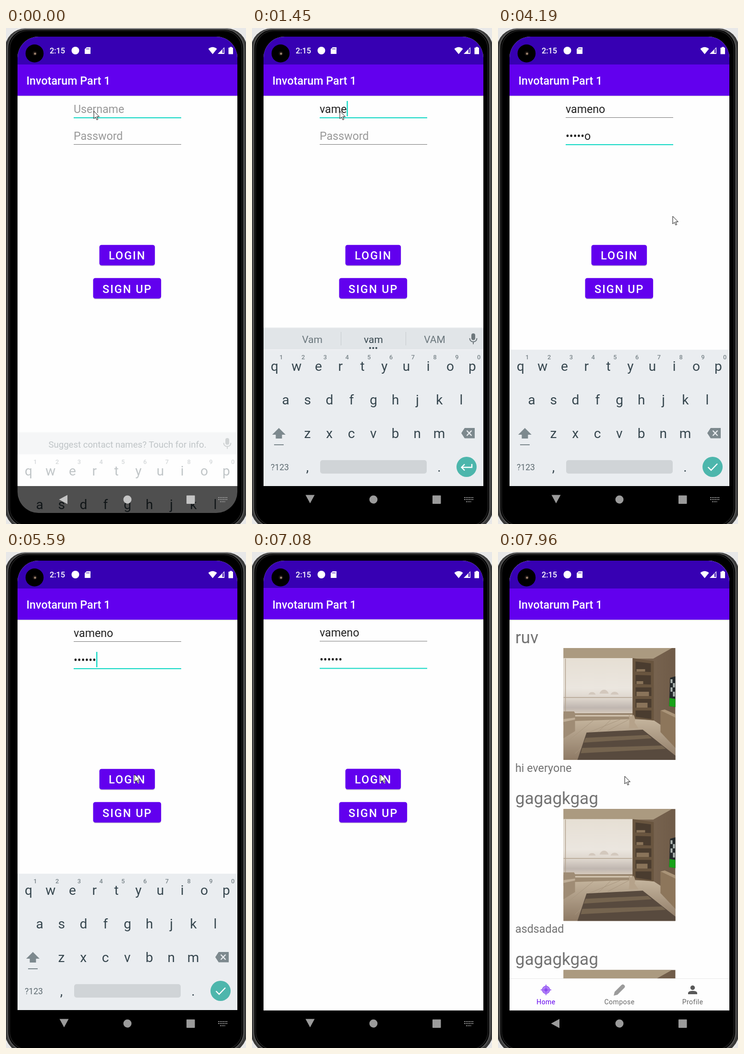
Write an HTML page that moves like this. It is 500x1033 px and loops after 8000 ms.

```html
<!DOCTYPE html>
<html lang="en">
<head>
<meta charset="utf-8">
<title>Login demo</title>
<style>
html, body { margin: 0; width: 100%; height: 100%; overflow: hidden; background: #e8e8e8; }
svg { display: block; width: 100%; height: 100%; font-family: Roboto, sans-serif; }
text { white-space: pre; }
.mid { text-anchor: middle; }
.med { font-weight: 500; }
.field { font-size: 23.2px; }
.btn { font-size: 23.3px; font-weight: 500; letter-spacing: 2.08px; fill: #fff; }
.key { font-size: 28px; fill: #37474f; text-anchor: middle; }
.num { font-size: 12.8px; font-weight: 500; fill: #7a858a; text-anchor: middle; }
.sug { font-size: 21px; fill: #6b777d; text-anchor: middle; }
.name { font-size: 35px; fill: #737373; }
.note { font-size: 23.3px; fill: #737373; }
.tab { font-size: 14px; letter-spacing: .45px; text-anchor: middle; fill: #666; }
</style>
</head>
<body>
<svg viewBox="0 0 500 1033" preserveAspectRatio="none">
  <defs>
    <clipPath id="screen"><rect x="24" y="18" width="458" height="992" rx="44"/></clipPath>
    <clipPath id="list"><rect x="24" y="141" width="458" height="747"/></clipPath>
    <linearGradient id="sky" x2="0" y2="1">
      <stop offset="0" stop-color="#e6dfd4"/><stop offset=".55" stop-color="#ebe6df"/>
      <stop offset=".74" stop-color="#dcd4cb"/><stop offset=".9" stop-color="#bfb6b0"/>
      <stop offset="1" stop-color="#d6cabc"/>
    </linearGradient>
    <linearGradient id="wall"><stop offset="0" stop-color="#96826a"/><stop offset="1" stop-color="#6f5b48"/></linearGradient>
    <linearGradient id="floor" x2="0" y2="1"><stop offset="0" stop-color="#c4b49d"/><stop offset="1" stop-color="#8e7a65"/></linearGradient>
    <g id="bars">
      <rect x="24" y="10" width="458" height="66" fill="#3700b3"/>
      <rect x="24" y="76" width="458" height="65" fill="#6200ee"/>
      <rect x="24" y="141" width="458" height="1.5" opacity=".12"/>
    </g>
    <g id="pic">
      <path d="M0 0H233V233H0Z" fill="url(#wall)"/>
      <path d="M0 0H226L187 22H0Z" fill="#ab9a80"/>
      <path d="M0 21H144V136H0Z" fill="url(#sky)"/>
      <path d="M0 103H143M4 22V136" fill="none" stroke="#b3a390" stroke-width="1.500"/>
      <path d="M0 137H144V150L85 150 24 156 0 160Z" fill="#9d8a72"/>
      <path d="M24 141H144" stroke="#d3c5b1" stroke-width="3"/>
      <path d="M52 97a8 8 0 0 1 15 0M75 95a10 12 0 0 1 19 0M98 97a9 9 0 0 1 17 0" fill="#d3c8bd"/>
      <path d="M0 172L24 152 143 148 187 150 233 180V233H0Z" fill="url(#floor)"/>
      <path d="M0 201L62 151M24 220L98 150M52 176L118 149M92 172L136 149" stroke="#a8967f" fill="none"/>
      <path d="M144 21L188 27V151L144 146Z" fill="#69553f"/>
      <path d="M150 28L182 32V50L150 49ZM150 56L182 57V76L150 75ZM150 82H183V100H150ZM150 106H183V124H150ZM150 130H183V148L150 143Z" fill="#4a3c2f"/>
      <path d="M152 44H170V49H152ZM152 69H166V75H152ZM152 91H178V100H152ZM152 114H175V124H152Z" fill="#8a745a"/>
      <path d="M48 176L165 170 233 224V233H29Z" fill="#584a3e"/>
      <path d="M46 187L176 181 184 188 42 197ZM39 208L205 203 213 210 36 219Z" fill="#75644f"/>
      <path d="M0 132H22L24 136V173L0 188Z" fill="#9f8c75"/>
      <path d="M0 148L24 145V149L0 154Z" fill="#bfae98"/>
      <path d="M202 130L233 145V208L202 175Z" fill="#8d765b"/>
      <path d="M202 130L211 128 233 138V145Z" fill="#aa9478"/>
      <path d="M222 62L233 59V123L220 121Z" fill="#23282a"/>
      <path d="M223 65H227V73H223ZM228 73H232V82H228ZM223 82H227V91H223ZM228 91H232V101H228Z" fill="#aeb6b2"/>
      <path d="M221 104L233 106V123L220 121Z" fill="#18a218"/>
      <path d="M136 167Q138 157 136 139L140 143 146 139Q151 148 148 155L156 167Z" fill="#b5a28a"/>
    </g>
  </defs>

  <rect width="500" height="1033" fill="#e8e8e8"/>
  <rect x="-2" y="1" width="504" height="1042" rx="42" fill="#393939"/>
  <rect x="3.500" y="2.500" width="492" height="1037" rx="40" fill="#000" stroke="#555" stroke-width="2.500"/>
  <rect x="7.500" y="5.500" width="484" height="1031" rx="38" fill="#000" stroke="#1d1d1d" stroke-width="2"/>

  <g clip-path="url(#screen)">
    <rect x="24" y="954" width="458" height="56" fill="#000"/>
    <g id="login">
      <rect x="24" y="18" width="458" height="936" fill="#fefefe"/>
      <use href="#bars"/>
      <text id="user" class="field" x="141" y="177"></text>
      <text id="pass" class="field" x="141" y="233"></text>
      <rect id="userLine" x="141" y="186" width="224"/>
      <rect id="passLine" x="141" y="242" width="224"/>
      <rect id="caret" width="2.400" height="32" fill="#12d8c5"/>
      <rect id="shade" x="195" width="115" height="42" rx="4" opacity=".16"/>
      <rect x="194.500" y="451.800" width="115.700" height="42.600" rx="4.500" fill="#6200ee"/>
      <rect id="ripple" x="194.500" y="451.800" width="115.700" height="42.600" rx="4.500" fill="#fff"/>
      <text class="btn" x="214" y="482">LOGIN</text>
      <rect x="182" y="523" width="141" height="42" rx="4" opacity=".16"/>
      <rect x="181.500" y="520.800" width="141.700" height="42.600" rx="4.500" fill="#6200ee"/>
      <text class="btn" x="201" y="551.500">SIGN UP</text>
    </g>
    <g id="feed">
      <rect x="24" y="18" width="458" height="936" fill="#fefefe"/>
      <use href="#bars"/>
      <g id="posts" clip-path="url(#list)"></g>
      <rect x="24" y="888" width="458" height="66" fill="#fefefe"/>
      <rect x="24" y="888" width="458" height="1" fill="#e8e8e8"/>
      <g fill="none" stroke="#9c62f4" stroke-width="2">
        <circle cx="100" cy="912" r="7.500" fill="#b98ff7"/>
        <path d="M100 901V923M89 912H111"/><circle cx="100" cy="912" r="3.500" fill="#8a45f1"/>
      </g>
      <path d="M241 924L243 916 257 902Q260 899 263 902 266 905 263 908L249 922Z" fill="#9b9b9b"/>
      <circle cx="405.500" cy="907.500" r="4.700" fill="#595959"/>
      <path d="M396 921V918Q397 914 405.500 914 414 914 415 918V921Z" fill="#595959"/>
      <text class="tab" x="100" y="942" style="fill:#6200ee">Home</text>
      <text class="tab" x="253" y="942">Compose</text>
      <text class="tab" x="405.500" y="942">Profile</text>
    </g>

    <text class="med" x="42.500" y="118" font-size="23.300" fill="#fff">Invotarum Part 1</text>
    <g fill="#fff">
      <text class="med" x="91" y="53" font-size="16.300">2:15</text>
      <circle cx="144.500" cy="47" r="8"/>
      <path d="M168 40H176V54H164V44Z"/>
      <path d="M421.500 43.500Q430.500 36 439.500 43.500L430.500 54.500Z"/>
      <path d="M455 40V54H441Z"/>
      <path d="M466 39.500H471V41H473V54.500H463.500V41H466Z"/>
    </g>
    <path d="M451 45V52H453.500V42.500Z" fill="#3700b3"/>
    <path d="M168 42V45M170.500 42V45M173 42V45" stroke="#3700b3"/>

    <g id="keyboard">
      <rect id="board" x="24" y="670" width="458" height="284"/>
      <g id="strip">
        <rect x="24" y="624" width="458" height="46" fill="#e1e5e8"/>
        <path d="M24 624H482M24 670H482" stroke="#f2f4f5" stroke-width="1.500"/>
        <text id="tip" class="mid" x="253" y="656" font-size="18.600" fill="#37474f">Suggest contact names? Touch for info.</text>
        <g id="words">
          <path d="M185.500 633V661M320.500 633V661" stroke="#c6cccf"/>
          <text id="w0" class="sug" x="125.500" y="656"></text>
          <text id="w1" class="sug" x="253" y="656" style="fill:#37474f"></text>
          <text id="w2" class="sug" x="380.500" y="656"></text>
          <g fill="#37474f"><circle cx="246" cy="666.500" r="2"/><circle cx="252.500" cy="666.500" r="2"/><circle cx="259" cy="666.500" r="2"/></g>
        </g>
        <rect x="457" y="636" width="8" height="14" rx="4" fill="#6d777c"/>
        <path d="M453.500 646Q454 653.500 461 653.500T468.500 646M461 653V658.500" fill="none" stroke="#6d777c" stroke-width="2"/>
      </g>
      <g id="keys"></g>
      <path d="M56 833L70 847H62.500V855H49.500V847H42Z" fill="#7d898e"/>
      <rect x="46" y="867" width="20" height="2" fill="#7d898e"/>
      <path d="M443 833H464V854.500H443L436 843.700Z" fill="#7d898e"/>
      <path d="M447.500 838.500L457.500 849M457.500 838.500L447.500 849" stroke="#eaedf0" stroke-width="2.300"/>
      <text class="mid" x="58" y="920.500" font-size="17.600" fill="#5f6c72">?123</text>
      <text class="key" x="115.500" y="924">,</text>
      <text class="key" x="390" y="924">.</text>
      <rect x="142" y="900" width="222" height="28" rx="5" fill="#d0d4d7"/>
      <circle cx="447" cy="914" r="21" fill="#4db6ac"/>
      <path id="enter" fill="none" stroke="#fff" stroke-width="2.400"/>
    </g>

    <g id="nav">
      <path id="back" d="M110.500 982L128 972.500V991.500Z"/>
      <circle cx="253" cy="982" r="8.500"/>
      <rect x="376" y="973.500" width="17.500" height="17.500" rx="1"/>
      <path id="ime" d="M442 978H461M442 982H461M446 986.500H457" stroke="#9b9b9b" stroke-width="2" stroke-dasharray="2 1.400"/>
    </g>
  </g>

  <circle cx="59.500" cy="53" r="18.800" fill="#000"/>
  <circle cx="60" cy="53" r="4.500" fill="#1a1411"/>
  <circle cx="60.500" cy="53.500" r="2.200" fill="#a58a74"/>
  <path id="mouse" d="M0 0V16L3.700 12.600 6.200 18.400 8.600 17.300 6.100 11.700H11.300Z" fill="#fff" stroke="#111"/>
</svg>
<script>
const LOOP = 8000, USER = 'vameno', TEAL = '#12d8c5';
const $ = id => document.getElementById(id);
const set = (id, attrs) => { for (const k in attrs) $(id).setAttribute(k, attrs[k]); };
const show = (id, on) => { $(id).style.display = on ? '' : 'none'; };

// Value of the last step whose time has been reached
const at = (t, steps) => {
  let value = steps[0][1];
  for (const [time, v] of steps) if (t >= time) value = v;
  return value;
};

// Keyboard and feed content
const label = (cls, x, y, s) => `<text class="${cls}" x="${x}" y="${y}">${s}</text>`;
const row = (chars, x, y) => [...chars].map((c, i) => label('key', x + 45.75 * i, y, c)).join('');
$('keys').innerHTML = row('qwertyuiop', 47, 714) + row('asdfghjkl', 70, 784) + row('zxcvbnm', 115.5, 854)
  + [...'1234567890'].map((c, i) => label('num', 61 + 45.75 * i, 690, c)).join('');
$('posts').innerHTML = [['ruv', 'hi everyone'], ['gagagkgag', 'asdsadad'], ['gagagkgag', '']].map(([who, note], i) =>
  `<g transform="translate(0 ${335.2 * i})">${label('name', 36, 190, who)}<use href="#pic" x="136.500" y="200"/>${label('note', 36, 458, note)}</g>`).join('');

const typed = [[0, 0], [920, 1], [1180, 2], [1300, 3], [1450, 4], [1570, 5], [1720, 6]];
const hinted = [[0, 0], [1180, 1], [1300, 2], [1450, 3], [1570, 4], [1720, 5], [1870, 6]];
const secret = [[0, 0], [2840, 2], [3120, 3], [3400, 4], [3520, 5], [3670, 6]];
const blink = [[0, 0], [130, 1], [670, 0], [920, 1], [4180, 0], [4580, 1], [5160, 0], [5590, 1], [6020, 0], [6580, 1], [7080, 0]];
const path = [[0, [183, 173]], [2020, [191, 173]], [2170, [200, 184]], [2290, [212, 204]], [2410, [219, 216]],
  [4060, [292, 262]], [4180, [364, 392]], [4310, [318, 476]], [4430, [268, 463]], [7840, [266, 465]], [7960, [264, 467]]];
const slide = [[0, 218], [130, 6], [250, 0]];
const turn = [[0, 0], [130, -25], [250, -80], [370, -90], [7230, -25], [7350, 0]];
const press = [[0, 0], [6020, .14], [6150, .24], [6300, 0]];
const zoom = [[0, 1], [7080, 1.002]];
const rise = [[0, 8], [7350, 1], [7470, 0]];

function field(id, value, hint) {
  $(id).textContent = value || hint;
  set(id, { fill: value ? '#212121' : '#999' });
}

const underline = (id, on) => set(id, { height: on ? 2 : 1, fill: on ? TEAL : '#777' });

function draw(t) {
  const name = USER.slice(0, at(t, typed));
  const len = at(t, secret);
  const hidden = '•'.repeat(Math.max(0, t < 5160 ? len - 1 : len));
  const pass = hidden + (len && t < 5160 ? USER[len - 1] : '');
  const onPass = t >= 2410, feed = t >= 7230, opening = t < 130;

  field('user', name, 'Username');
  field('pass', pass, 'Password');
  underline('userLine', !onPass);
  underline('passLine', onPass);

  const [active, value] = onPass ? ['pass', pass] : ['user', name];
  const width = value ? $(active).getComputedTextLength() : 0;
  set('caret', { x: 141 + width, y: onPass ? 208 : 152, opacity: at(t, blink) });

  const down = at(t, press);
  set('ripple', { opacity: down });
  set('shade', { y: down ? 457 : 454 });
  set('login', { transform: `translate(0 548) scale(1 ${at(t, zoom)}) translate(0 -548)` });

  show('feed', feed);
  show('posts', t >= 7470);
  set('feed', { transform: `translate(0 ${at(t, rise)})` });

  show('keyboard', t < 7080);
  set('keyboard', { transform: `translate(0 ${at(t, slide)})`, opacity: opening ? .31 : 1 });
  set('board', { fill: opening ? '#fff' : '#eaedf0' });
  show('strip', t < 2560);
  const word = USER.slice(0, at(t, hinted));
  show('tip', !word);
  show('words', word);
  [word.charAt(0).toUpperCase() + word.slice(1), word, word.toUpperCase()].forEach((s, i) => $('w' + i).textContent = s);
  set('enter', { d: t < 2560 ? 'M458 908V915H437M443 908.500L436.500 915 443 921.500' : 'M437.500 914.500L444 921 457 907.500' });

  set('back', { transform: `rotate(${at(t, turn)} 119.75 980.75)` });
  show('ime', !feed);
  set('nav', { fill: opening ? '#c4c4c4' : '#9b9b9b' });
  set('mouse', { transform: `translate(${at(t, path)})` });
}

const start = performance.now();
function tick(now) {
  draw(Math.max(0, now - start) % LOOP);
  requestAnimationFrame(tick);
}
draw(0);
requestAnimationFrame(tick);
</script>
</body>
</html>
```
